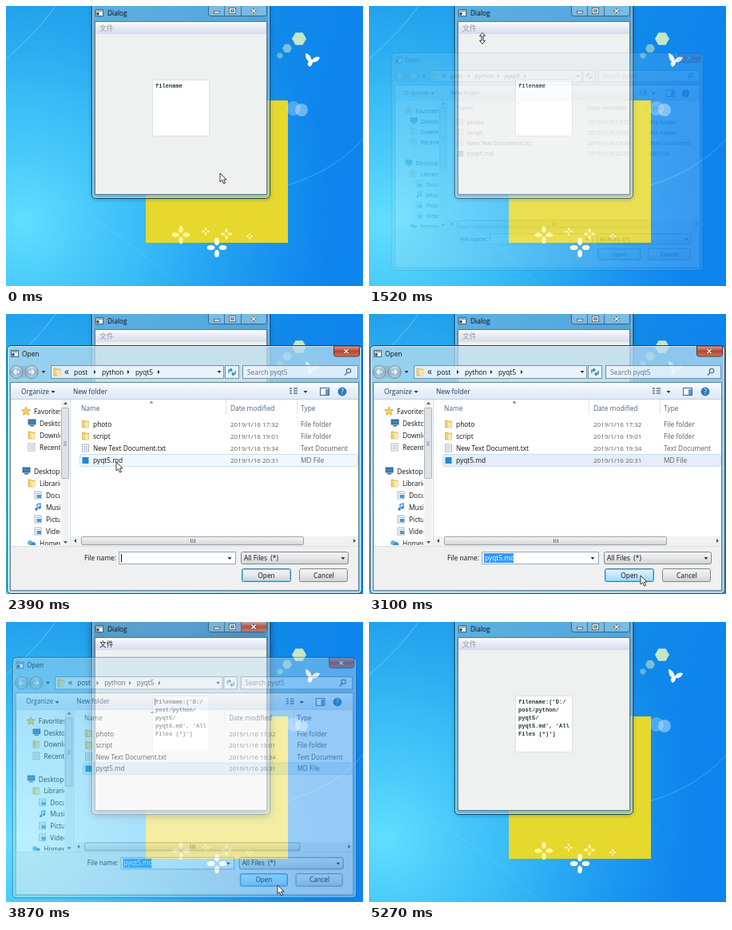
These frames come from a looping animation (447 by 350 pixels, 5370 ms). An HTML page:

```html
<!DOCTYPE html>
<html lang="en">
<head>
<meta charset="utf-8">
<title>File dialog demo</title>
<style>
html, body { margin: 0; width: 100%; height: 100%; overflow: hidden; background: #1795ea; }
svg { display: block; width: 100%; height: 100%; }
text { font: 8.4px "Open Sans", "Noto Sans CJK SC", "Noto Sans CJK", sans-serif; white-space: pre; }
.mono { font: bold 7.1px "Liberation Mono", monospace; fill: #23382f; }
.date { font-size: 8px; }
.cjk { font-size: 8.7px; }
#main { filter: drop-shadow(0 1px 2px #0346); }
#main.active { filter: drop-shadow(0 2px 5px #012a); }
</style>
</head>
<body>
<svg id="stage" viewBox="0 0 447 350" xmlns="http://www.w3.org/2000/svg"></svg>
<script>
const LOOP = 5370;
const rect = (x, y, w, h, fill, more = '') =>
  `<rect x="${x}" y="${y}" width="${w}" height="${h}" fill="${fill}" ${more}/>`;
const text = (x, y, s, fill = '#111', more = '') =>
  `<text x="${x}" y="${y}" fill="${fill}" ${more}>${s}</text>`;
const path = (d, stroke, width = 1, fill = 'none', more = '') =>
  `<path d="${d}" stroke="${stroke}" stroke-width="${width}" fill="${fill}" ${more}/>`;
const circle = (x, y, r, fill, more = '') =>
  `<circle cx="${x}" cy="${y}" r="${r}" fill="${fill}" ${more}/>`;
const group = (id, body, more = '') => `<g id="${id}" ${more}>${body}</g>`;
const line = c => `stroke="${c}" stroke-width="1"`;
const gradient = (id, stops, dir = 'x2="0" y2="1"') =>
  `<linearGradient id="${id}" ${dir}>${stops.map((c, i) =>
    `<stop offset="${i / (stops.length - 1)}" stop-color="${c}"/>`).join('')}</linearGradient>`;
const down = (x, y, c = '#333') => path(`M${x - 2.5} ${y - 1}h5l-2.5 3z`, 'none', 0, c);
const right = (x, y) => path(`M${x - 1} ${y - 2.5}v5l2.5-2.5z`, 'none', 0, '#222');

const flower = (x, y, r, fill) => [0, 90, 180, 270].map(a =>
  `<ellipse cx="${x}" cy="${y - r * .62}" rx="${r * .24}" ry="${r * .4}" fill="${fill}" transform="rotate(${a} ${x} ${y})"/>`).join('');
const hexagon = (x, y, r, alpha) => path('M' + [0, 1, 2, 3, 4, 5].map(i =>
  `${x + r * Math.cos(i * Math.PI / 3)} ${y + r * Math.sin(i * Math.PI / 3)}`).join('L') + 'z',
  'none', 0, '#e4f7c4', `opacity="${alpha}"`);

function wallpaper() {
  return rect(0, 0, 447, 350, 'url(#sky)') + rect(0, 0, 447, 350, 'url(#glow)') +
    path('M0 66Q38 34 62 0', '#9de4ff', 1, 'none', 'opacity=".5"') +
    path('M0 208Q130 265 215 350', '#9de4ff', 1, 'none', 'opacity=".2"') +
    path('M320 232Q405 215 447 166', '#8fd2ff', 1, 'none', 'opacity=".4"') +
    rect(175, 118, 178, 178, '#e6d82c') +
    hexagon(367, 41, 9, .85) + hexagon(352, 53, 6, .5) + hexagon(343, 62, 4, .4) +
    circle(370, 130, 8, '#bfe8ff', 'opacity=".5"') + circle(360, 128, 9, '#d6f2ff', 'opacity=".3"') +
    path('M383 68Q381 60 375 59Q375 67 379 69Q376 73 380 76Q384 74 384 70Q391 71 393 64Q386 62 383 68z', 'none', 0, '#fff') +
    flower(264, 302, 12, '#fffce0') + flower(219, 286, 11, '#fff6a0') +
    flower(276, 285, 7, '#fff6a0') + flower(250, 282, 5, '#fff6a0') + flower(305, 288, 4, '#fff6c8');
}

const appIcon = (x, y) => rect(x, y, 9, 8, '#fff', line('#467')) +
  rect(x + 1, y + 1, 7, 1.5, '#68a') + rect(x + 1, y + 3.5, 3, 3.5, '#345');

function mainWindow() {
  const lines = ["filename:('D:/", 'post/python/', 'pyqt5/', "pyqt5.md', 'All", "Files (*)')"];
  return rect(107.5, -8, 223, 248.5, '#a9dcf8', 'rx="5" fill-opacity=".45" stroke="#16415e"') +
    rect(108.5, -7, 221, 246.5, 'none', 'rx="4" stroke="#fff" stroke-opacity=".5"') +
    appIcon(112.5, 4.5) + text(127, 12, 'Dialog', '#111') +
    rect(253.5, -4, 73, 16.5, '#b5def5', 'rx="3" fill-opacity=".4" stroke="#2f6688"') +
    group('close', path('M295 0h31v10q0 2-2 2h-29z', 'none', 0, 'url(#red)'), 'opacity=".85"') +
    path('M273.5 0v12M294.5 0v12', '#3f7290') +
    rect(260.5, 6.5, 7, 2.5, '#fff', 'stroke="#456" stroke-width=".8"') +
    rect(280.5, 3.5, 6, 5, 'none', 'stroke="#345" stroke-width="3"') +
    rect(280.5, 3.5, 6, 5, 'none', 'stroke="#fff" stroke-width="1.5"') +
    path('M307.5 3.5l5 5m0-5l-5 5', '#345', 3) + path('M307.5 3.5l5 5m0-5l-5 5', '#fff', 1.6) +
    rect(111.5, 19.5, 215, 216, '#eff0f0', line('#5d7d90')) +
    rect(112, 20, 214, 15, 'url(#menubar)') +
    group('menuOn', rect(112.5, 21.5, 26, 13, '#d3dced', 'rx="1" stroke="#7c8ba5"')) +
    text(117, 31, '文件', '#222', 'id="menuText" class="cjk"') +
    rect(183.5, 92.5, 71, 70, '#fff', 'id="box" stroke="#dbe3ea"') +
    text(187, 102, 'filename', '', 'id="before" class="mono"') +
    group('after', lines.map((s, i) => text(187, 102 + 10 * i, s, '', 'class="mono"')).join('')) +
    rect(186, 95, 1, 9, '#111', 'id="caret"') +
    group('popup', rect(115, 38, 60, 19, '#000', 'opacity=".35"') +
      rect(112.5, 35.5, 59, 18, '#f4f5f7', line('#8c959e')) +
      group('hover', rect(114.5, 37.5, 55, 14, '#dceafa', 'rx="2" stroke="#aecff0"')) +
      text(137, 48, '打开', '#222', 'class="cjk"'));
}

const folder = (x, y) => path(`M${x} ${y}h3l1 1h4v8h-8z`, '#c79d39', .6, '#f1d276') +
  path(`M${x + 3} ${y + 2}h5v7h-4z`, 'none', 0, '#fae9a8');
const page = (x, y) => rect(x, y, 8, 9, '#fff', 'stroke="#8495a5" stroke-width=".7"') +
  path(`M${x + 1.5} ${y + 2.5}h5m-5 2h5m-5 2h5`, '#7f9ab5', .7);
const screen = (x, y) => rect(x, y, 9, 6, '#2d87d0', 'stroke="#345" stroke-width=".8"') +
  rect(x + 2, y + 7, 5, 1.5, '#567');
const sidePage = (x, y) => page(x, y) + rect(x + 3, y + 4, 5, 4, '#3d9bd8');

function sidebar() {
  const star = path('M25 116l1.5 3.5 4 .3-3 2.6 1 3.9-3.5-2.1-3.5 2.1 1-3.9-3-2.6 4-.3z', '#c48b13', .6, '#ffd34d');
  const items = [
    [35, 125, 'Favorites'], [42, 140, 'Desktop', screen], [42, 155, 'Downloads', folder],
    [42, 170, 'Recent Places', page], [35, 200, 'Desktop', screen], [42, 215, 'Libraries', folder],
    [50, 230, 'Documents', sidePage], [50, 245, 'Music'], [50, 260, 'Pictures', sidePage],
    [50, 275, 'Videos', sidePage], [42, 290, 'Homegroup']];
  return `<g clip-path="url(#side)">` + star + items.map(([x, y, s, icon]) =>
    text(x, y, s) + (icon ? icon(x - 14, y - 8) : '')).join('') +
    path('M39 244v-6l4-1v5', '#2684d8', 1.2) + circle(38, 244, 1.8, '#2684d8') +
    circle(42, 242, 1.8, '#2684d8') + circle(30, 286, 3, '#68b8d8') + circle(34, 288, 3, '#3b8ecc') + '</g>' +
    rect(69, 107, 10, 183, '#f0f2f3') + rect(69.5, 117.5, 9, 88, '#dfe3e6', 'rx="1" stroke="#a1a8ae" stroke-width=".8"') +
    path('M72 113l2.5-3 2.5 3zM72 284l2.5 3 2.5-3z', 'none', 0, '#556') +
    path('M72 160h4m-4 2h4m-4 2h4', '#778', .7) + path('M80.5 107v183', '#d4dde6');
}

function fileList() {
  const rows = [['photo', '17:32', 'File folder', folder], ['script', '19:01', 'File folder', folder],
    ['New Text Document.txt', '19:34', 'Text Document', page],
    ['pyqt5.md', '20:31', 'MD File', (x, y) => rect(x, y + 1, 8, 8, '#2389cf')]];
  return text(94, 121, 'Name', '#4c607a') + text(281, 121, 'Date modified', '#4c607a') +
    text(369, 121, 'Type', '#4c607a') + path('M275.5 107v18M364.5 107v18', '#dde5ee') +
    path('M179.5 111.5l2.5-3 2.5 3z', 'none', 0, '#789') +
    rect(92.5, 175.5, 348, 15, '#e8f3fc', 'id="row" rx="2" stroke="#c5dff4"') +
    rows.map(([name, time, type, icon], i) => {
      const y = 141 + 15 * i;
      return icon(95.5, y - 8) + text(109, y, name) +
        text(281, y, '2019/1/16 ' + time, '#5d5d5d', 'class="date"') + text(369, y, type, '#5d5d5d');
    }).join('') +
    rect(81, 278, 360, 12, '#f0f1f2') + rect(94.5, 278.5, 278, 10, 'url(#button)', 'rx="1" stroke="#9aa2aa"') +
    path('M231.5 281v5m2.5-5v5m2.5-5v5', '#567', .9) +
    path('M88 281v5l-3-2.5zM435 281v5l3-2.5z', 'none', 0, '#456');
}

function dialog() {
  const bar = 'fill-opacity=".75" stroke="#7191a5"';
  return rect(1.5, 39.5, 444, 310, '#b9dcee', 'rx="5" fill-opacity=".75" stroke="#1c3c50"') +
    rect(2.5, 40.5, 442, 308, 'none', 'rx="4" stroke="#fff" stroke-opacity=".6"') +
    appIcon(6.5, 45.5) + text(20, 52.5, 'Open') +
    path('M410.5 40h32v10q0 3-3 3h-26q-3 0-3-3z', '#5b3434', 1, 'url(#red)') +
    path('M423.5 44l5 5m0-5l-5 5', '#5b3434', 2.8) + path('M423.5 44l5 5m0-5l-5 5', '#fff', 1.5) +
    rect(5, 65, 36, 15, '#89adc2', 'rx="7.5" opacity=".5"') +
    [13, 32].map(x => circle(x, 72.5, 8, 'url(#orb)', 'stroke="#6e8ea3"')).join('') +
    path('M17 72.5h-7m3-3l-3 3 3 3M28 72.5h7m-3-3l3 3-3 3', '#e9f4fa', 1.8) + down(47, 72) +
    rect(56.5, 64.5, 216, 16, '#f4fafd', bar) + rect(274.5, 64.5, 17, 16, '#f4fafd', bar) +
    rect(296.5, 64.5, 144, 16, '#f4fafd', bar) +
    folder(60, 68) + text(73, 75.5, '«', '#222', 'style="font-size:12px"') +
    text(85, 75.5, 'post') + right(111, 72.5) + text(120, 75.5, 'python') + right(153, 72.5) +
    text(162, 75.5, 'pyqt5') + right(191, 72.5) + down(267, 72) +
    path('M279 74v-4h4m-2-2l2 2-2 2M287 71v4h-4m2-2l-2 2 2 2', '#2b82bb', 1.3) +
    text(302, 75.5, 'Search pyqt5', '#65727c', 'font-style="italic"') +
    circle(429, 71, 2.7, 'none', 'stroke="#4e7590" stroke-width="1.2"') + path('M427 73.5l-3 3', '#4e7590', 1.5) +
    rect(5.5, 85.5, 436, 260, '#fff', line('#61818f')) +
    rect(6, 86, 435, 20, 'url(#toolbar)') + path('M6 106.5h435', '#c2d0df') +
    text(19, 99.5, 'Organize', '#1e395b') + down(59, 97) + text(84, 99.5, 'New folder', '#1e395b') +
    path('M355 93h3m2 0h5m-10 3h3m2 0h5m-10 3h3m2 0h5', '#587897', 1.5) + down(375, 97) +
    rect(393.5, 92.5, 11, 9, '#fff', line('#3e6587')) + rect(400, 94, 4, 7, '#5b9bd1') +
    circle(421, 97, 5, '#267fc4', 'stroke="#195686" stroke-width=".7"') +
    text(419.2, 100, '?', '#fff', 'font-weight="bold"') +
    sidebar() + fileList() +
    rect(6, 290, 435, 55, '#f0f0f0') + path('M6 290.5h435', '#d9dfe5') +
    text(138, 307.5, 'File name:', '#111', 'text-anchor="end"') +
    rect(141.5, 297.5, 146, 15, '#fff', line('#8eacc8')) + down(280, 305) +
    rect(144, 299, 37, 12, '#3399ff', 'id="picked"') + text(145, 307.5, 'pyqt5.md', '#222', 'id="name"') +
    rect(144, 300, 1, 10, '#111', 'id="fieldCaret"') +
    rect(294.5, 297.5, 134, 15, 'url(#button)', 'rx="2" stroke="#81878c"') + text(298, 307.5, 'All Files  (*)') + down(422, 305) +
    rect(295.5, 318.5, 61, 16, 'url(#button)', 'id="ok" rx="2" stroke="#3c7fb1"') +
    rect(296.5, 319.5, 59, 14, 'none', 'rx="1" stroke="#58cef5" stroke-opacity=".8"') +
    text(326, 329.5, 'Open', '#111', 'text-anchor="middle"') +
    rect(367.5, 318.5, 60, 16, 'url(#button)', 'rx="2" stroke="#81878c"') +
    text(398, 329.5, 'Cancel', '#111', 'text-anchor="middle"');
}

const defs = '<defs>' +
  gradient('sky', ['#1590e0', '#148fe6', '#0e84ee'], 'x2="1" y2=".2"') +
  gradient('red', ['#d9a094', '#b8452f', '#cf7558']) +
  gradient('menubar', ['#fbfcfd', '#e6eaf4', '#d6dcea']) +
  gradient('toolbar', ['#fbfdff', '#e8f0f9', '#dfe9f5']) +
  gradient('button', ['#f4f4f4', '#e6e7e8', '#d2d3d4']) +
  gradient('hot', ['#e8f5fd', '#c4e6fa', '#a2d5f2']) +
  gradient('orb', ['#d3e5ee', '#8fb1c5', '#b2d1e1']) +
  `<radialGradient id="glow" gradientUnits="userSpaceOnUse" cx="20" cy="270" r="390">
    <stop stop-color="#62deff"/><stop offset=".4" stop-color="#45cbfd" stop-opacity=".75"/>
    <stop offset="1" stop-color="#2cb0fa" stop-opacity="0"/></radialGradient>
  <clipPath id="side"><rect x="6" y="107" width="62" height="182"/></clipPath></defs>`;

const $ = id => document.getElementById(id);
$('stage').innerHTML = defs + wallpaper() + group('main', mainWindow()) + group('dialog', dialog()) +
  group('arrow', path('M0 0v11l2.6-2.4 2 4.4 2-.9-2-4.2h3.6z', '#222', .9, '#fff')) +
  group('resize', path('M0-7l3.5 4h-2.5v6h2.5l-3.5 4-3.5-4h2.5v-6h-2.5z', '#222', .9, '#fff'));

// time, x, y of the pointer
const route = [[0, 268, 209], [130, 268, 209], [580, 126, 27], [670, 126, 27], [790, 142, 38],
  [1190, 142, 40], [2030, 142, 41], [2340, 138, 185], [2590, 138, 185], [2790, 340, 327],
  [3100, 340, 327], [3340, 342, 330], [3760, 342, 330], [3870, 340, 329], [4020, 340, 327],
  [4570, 371, 290], [5100, 438, 350], [LOOP, 438, 350]];
const clamp = v => Math.max(0, Math.min(1, v));

function pointer(t) {
  const i = route.findIndex(k => k[0] > t);
  const [t0, x0, y0] = route[i - 1], [t1, x1, y1] = route[i];
  let p = (t - t0) / (t1 - t0);
  p = p * p * (3 - 2 * p);
  return `translate(${x0 + (x1 - x0) * p} ${y0 + (y1 - y0) * p})`;
}

const show = (id, on) => $(id).style.display = on ? '' : 'none';

function draw(t) {
  const within = (a, b) => t >= a && t < b;
  const modal = within(1520, 3770), active = within(150, 1520) || within(3770, 5270);
  $('main').setAttribute('class', active ? 'active' : '');
  show('close', active);
  $('menuText').setAttribute('fill', active ? '#222' : '#999');
  show('menuOn', within(620, 1340));
  show('popup', within(660, 1340));
  show('hover', within(740, 1340));
  $('box').setAttribute('stroke', within(150, 1340) ? '#8fb8da' : '#dbe3ea');
  show('before', t < 3770);
  show('after', t >= 3770);
  show('caret', within(3770, 5270) && (t - 3770) % 1060 < 530);

  const opening = 1 - (1 - clamp((t - 1500) / 230)) ** 2;
  const closing = clamp((t - 3770) / 230);
  const scale = (.85 + .15 * opening) * (1 - .07 * closing);
  show('dialog', within(1520, 4000));
  $('dialog').setAttribute('opacity', opening * (1 - closing));
  $('dialog').setAttribute('transform', `translate(223 195) scale(${scale}) translate(-223 -195)`);
  show('row', t >= 2300);
  $('row').setAttribute('fill', t < 2480 ? '#f1f8fe' : '#e3eefa');
  show('name', t >= 2480);
  show('picked', t >= 3100);
  $('name').setAttribute('fill', t < 3100 ? '#222' : '#fff');
  show('fieldCaret', modal && t < 2480 && (t - 1800) % 1060 > 500);
  $('ok').setAttribute('fill', t >= 2770 ? 'url(#hot)' : 'url(#button)');

  const sizing = within(1520, 1830), place = pointer(t);
  show('arrow', !sizing && t < 5100);
  show('resize', sizing);
  $('arrow').setAttribute('transform', place);
  $('resize').setAttribute('transform', place);
}

function tick() {
  draw(performance.now() % LOOP);
  requestAnimationFrame(tick);
}
tick();
</script>
</body>
</html>
```
